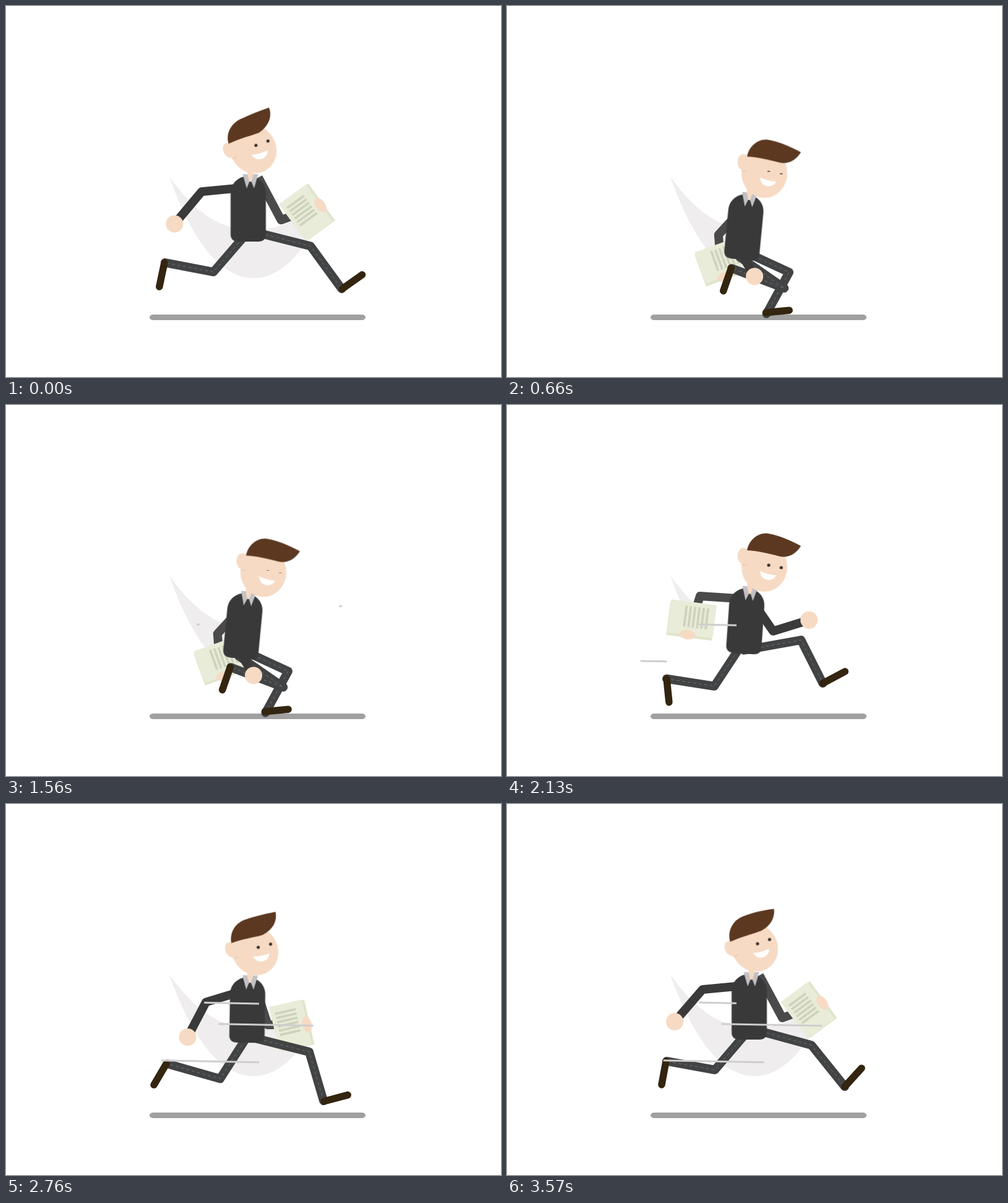
Write an HTML page without scripts that moves like this. It is 800x600 px and loops after 3600 ms.

```html
<!DOCTYPE html>
<html lang="en">
<head>
<meta charset="utf-8">
<title>Running with papers</title>
<style>
  html, body { margin: 0; width: 100%; height: 100%; overflow: hidden; background: #fff; }
  svg { display: block; width: 800px; height: 600px; }

  path { stroke-linejoin: round; }
  .limb { fill: none; stroke: #424344; stroke-width: 14; stroke-linecap: round; }
  .stitch { fill: none; stroke: #6e6e6e; stroke-width: 1; stroke-dasharray: 5 4; }
  .shoe { fill: none; stroke: #33250f; stroke-width: 11.5; stroke-linecap: round; }
  .arm { fill: none; stroke: #3a3a3a; stroke-width: 14; }
  .far.arm { stroke: #4a4a4a; }
  .skin { fill: #f6dac3; }
  .cloth { fill: #393939; }
  .collar { fill: #c3c1c4; }

  /* One full stride is 900 ms; the far side runs half a stride apart. */
  .leg { animation: leg 900ms linear infinite; }
  .shoe { animation: shoe 900ms linear infinite; }
  .arm { animation: arm 900ms linear infinite; }
  .far { animation-delay: -450ms; }
  .papers { animation: papers 900ms linear infinite; }
  .sweep { animation: sweep 900ms linear infinite; }
  .torso { animation: torso 450ms ease-in-out infinite; }
  .head { animation: head 450ms ease-in-out infinite; }
  .hair { fill: #5c3820; animation: hair 450ms ease-in-out infinite; }
  .eye { fill: #3a3532; transform-box: fill-box; transform-origin: center; animation: blink 3600ms linear infinite; }
  .gusts { stroke: #d0cdce; stroke-width: 3; fill: none; animation: gusts 3600ms infinite; }
  .gusts use { animation: gust 3600ms linear var(--at) infinite both; }

  @keyframes leg {
    0%, 100% { d: path("M393 363L492 388L543 457"); }
    10% { d: path("M390 382L489 407L499 491"); }
    23.33% { d: path("M383 397L457 430L421 498"); }
    30% { d: path("M383 392L400 470L332 483"); }
    36.67% { d: path("M383 382L335 455L258 443"); }
    46.67% { d: path("M394 362L336 430L258 416"); }
    50% { d: path("M394 362L335 430L257 415"); }
    56.67% { d: path("M391 374L345 444L260 420"); }
    61.67% { d: path("M388 385L394 462L308 432"); }
    73.33% { d: path("M376 406L448 457L362 424"); }
    86.67% { d: path("M383 397L475 380L510 450"); }
    96.67% { d: path("M393 363L492 390L546 457"); }
  }
  @keyframes shoe {
    0%, 100% { d: path("M544 457L576 434"); }
    10% { d: path("M500 492L541 488"); }
    23.33% { d: path("M420 496L458 492"); }
    30% { d: path("M332 483L350 501"); }
    36.67% { d: path("M258 443L262 481"); }
    46.67% { d: path("M257 416L250 454"); }
    50% { d: path("M256 415L248 454"); }
    56.67% { d: path("M258 420L238 454"); }
    61.67% { d: path("M307 432L288 467"); }
    73.33% { d: path("M361 424L348 461"); }
    86.67% { d: path("M510 450L546 431"); }
    96.67% { d: path("M546 457L573 427"); }
  }
  @keyframes arm {
    0%, 100% { d: path("M380 294L316 300L272 352"); }
    23.33% { d: path("M383 325L341 370L346 438"); }
    36.67% { d: path("M390 308L430 366L488 348"); }
    46.67%, 50% { d: path("M408 277L445 346L507 323"); }
    73.33% { d: path("M386 325L370 385L401 438"); }
    86.67% { d: path("M385 314L312 309L292 373"); }
    96.67% { d: path("M380 294L316 300L271 352"); }
  }
  @keyframes papers {
    0%, 100% { transform: translate(485px, 334px) rotate(-36.5deg); }
    23.33% { transform: translate(398px, 418px) rotate(45deg); }
    36.67% { transform: translate(299px, 346px) rotate(97deg); }
    50% { transform: translate(278px, 328px) rotate(110deg); }
    73.33% { transform: translate(346px, 412px) rotate(71deg); }
    86.67% { transform: translate(467px, 352px) rotate(-15deg); }
    96.67% { transform: translate(486px, 334px) rotate(-36.5deg); }
  }
  @keyframes sweep {
    0%, 100% { transform: translate(388px, 300px) rotate(17deg); }
    23.33% { transform: translate(388px, 300px) rotate(85deg); }
    36.67% { transform: translate(388px, 300px) rotate(153deg); }
    50% { transform: translate(388px, 300px) rotate(166deg); }
    73.33% { transform: translate(388px, 300px) rotate(110deg); }
    86.67% { transform: translate(388px, 300px) rotate(33deg); }
    96.67% { transform: translate(388px, 300px) rotate(17deg); }
  }
  @keyframes torso {
    0%, 93.33%, 100% { transform: translate(391.5px, 381px); }
    46.67% { transform: translate(378.5px, 410px) rotate(5.5deg); }
    73.33% { transform: translate(382px, 402px) rotate(4deg); }
  }
  @keyframes head {
    0%, 100% { transform: translate(397px, 275px) rotate(-31deg); }
    46.67% { transform: translate(391.5px, 306.5px) rotate(0deg); }
    73.33% { transform: translate(391.5px, 298px) rotate(0deg); }
    93.33% { transform: translate(397.5px, 275.5px) rotate(-30.5deg); }
  }
  @keyframes hair {
    0%, 100% { d: path("M-5 -64C-1 -79 12 -89 30 -88.5C46 -87 64 -84 81 -80.5C79 -66 66 -55 46 -54C30 -57 15 -62 -5 -64Z"); }
    46.67%, 73.33% { d: path("M-3.5 -63C-1 -78 12 -91 28 -90.5C43 -89 65 -80 83.5 -70C75 -56 62 -50 48 -53.5C30 -58 15 -62 -3.5 -63Z"); }
    93.33% { d: path("M-5 -64C-1 -79 12 -90 29 -89.5C45 -88 65 -82 83 -74C78 -61 64 -53 47 -54C30 -57 15 -62 -5 -64Z"); }
  }
  @keyframes blink {
    0%, 16%, 20.5%, 41.5%, 45.5%, 100% { transform: scaleY(1); }
    18.33% { transform: scaleY(.35); }
    43.33% { transform: scaleY(.12); }
  }
  @keyframes gust {
    0% { stroke-dasharray: 0 0 0 200; }
    3.22% { stroke-dasharray: 0 1 19 200; }
    8.06% { stroke-dasharray: 0 14 69.5 200; }
    12.89% { stroke-dasharray: 0 73 26 200; }
    16.11%, 100% { stroke-dasharray: 0 100 0 200; }
  }
  @keyframes gusts {
    0%, 8% { visibility: hidden; }
    8.01%, 100% { visibility: visible; }
  }
</style>
</head>
<body>
<svg viewBox="0 0 800 600">
  <defs>
    <clipPath id="swept"><rect class="sweep" x="-400" width="800" height="400"/></clipPath>
    <marker id="fist" markerUnits="userSpaceOnUse" markerWidth="30" markerHeight="30" refX="15" refY="15">
      <circle class="skin" cx="15" cy="15" r="14"/>
    </marker>
    <path id="gust" d="M235 4.5L0 0" pathLength="100"/>
  </defs>

  <path clip-path="url(#swept)" fill="#efedee"
    d="M264 276C290 350 335 440 400 440S510 350 536 276C490 340 450 362 400 362S310 340 264 276Z"/>
  <rect x="232" y="499" width="349" height="9" rx="6" ry="4.5" fill="#a0a0a0"/>

  <path class="far arm" d="M408 277L445 346L507 323"/>
  <g class="papers">
    <rect x="-23" y="-36" width="54" height="74" fill="#e0e4cb"/>
    <rect x="-27" y="-37" width="54" height="74" fill="#e9ecd8"/>
    <path stroke="#cdd1bb" stroke-width="3.5"
      d="M-20 -24h34M-20 -17h34M-20 -10h34M-20 -3h34M-20 4h34M-20 11h34"/>
    <ellipse class="skin" cx="26.5" cy="4" rx="7.5" ry="13"/>
  </g>

  <path class="far leg limb" d="M394 362L335 430L257 415"/>
  <path class="far leg stitch" d="M394 362L335 430L257 415"/>
  <path class="far shoe" d="M256 415L248 454"/>

  <path class="leg limb" d="M393 363L492 388L543 457"/>
  <path class="leg stitch" d="M393 363L492 388L543 457"/>
  <path class="shoe" d="M544 457L576 434"/>

  <path class="arm" d="M380 294L316 300L272 352" marker-end="url(#fist)"/>

  <g class="torso">
    <path class="cloth" d="M-28.5 -78C-28.5 -95 -15 -106 0 -106S28.5 -95 28.5 -78V-12Q28.5 0 16 0H-16Q-28.5 0 -28.5 -12Z"/>
    <rect class="skin" x="-1.5" y="-120" width="10" height="23" rx="2"/>
    <path class="collar" d="M-9 -109L-2.5 -86L2 -97L-1.5 -109ZM16 -109L9.5 -86L5 -97L8.5 -109Z"/>
  </g>

  <g class="head">
    <ellipse class="skin" cx="-9.5" cy="-54" rx="9.5" ry="13"/>
    <ellipse class="skin" cx="24.5" cy="-36" rx="37" ry="40"/>
    <path d="M-13 -40q5 2 9 0" fill="none" stroke="#e3c4ae"/>
    <circle class="eye" cx="31.5" cy="-39" r="2.6"/>
    <circle class="eye" cx="51.7" cy="-35" r="2.6"/>
    <path fill="#fff" d="M17.5 -29.5q1 13 13 14.5q9 .5 13 -7.5q-14 -1 -26 -7z"/>
    <path class="hair" d="M-5 -64C-1 -79 12 -89 30 -88.5C46 -87 64 -84 81 -80.5C79 -66 66 -55 46 -54C30 -57 15 -62 -5 -64Z"/>
  </g>

  <g class="gusts">
    <use href="#gust" x="308" y="321" style="--at:1550ms"/>
    <use href="#gust" x="308" y="321" style="--at:2344ms"/>
    <use href="#gust" x="308" y="321" style="--at:3106ms"/>
    <use href="#gust" x="308" y="355" style="--at:990ms"/>
    <use href="#gust" x="308" y="355" style="--at:1666ms"/>
    <use href="#gust" x="308" y="355" style="--at:2454ms"/>
    <use href="#gust" x="308" y="355" style="--at:3280ms"/>
    <use href="#gust" x="214" y="414" style="--at:940ms"/>
    <use href="#gust" x="214" y="414" style="--at:1632ms"/>
    <use href="#gust" x="214" y="414" style="--at:2462ms"/>
    <use href="#gust" x="214" y="414" style="--at:3280ms"/>
  </g>
</svg>
</body>
</html>
```
